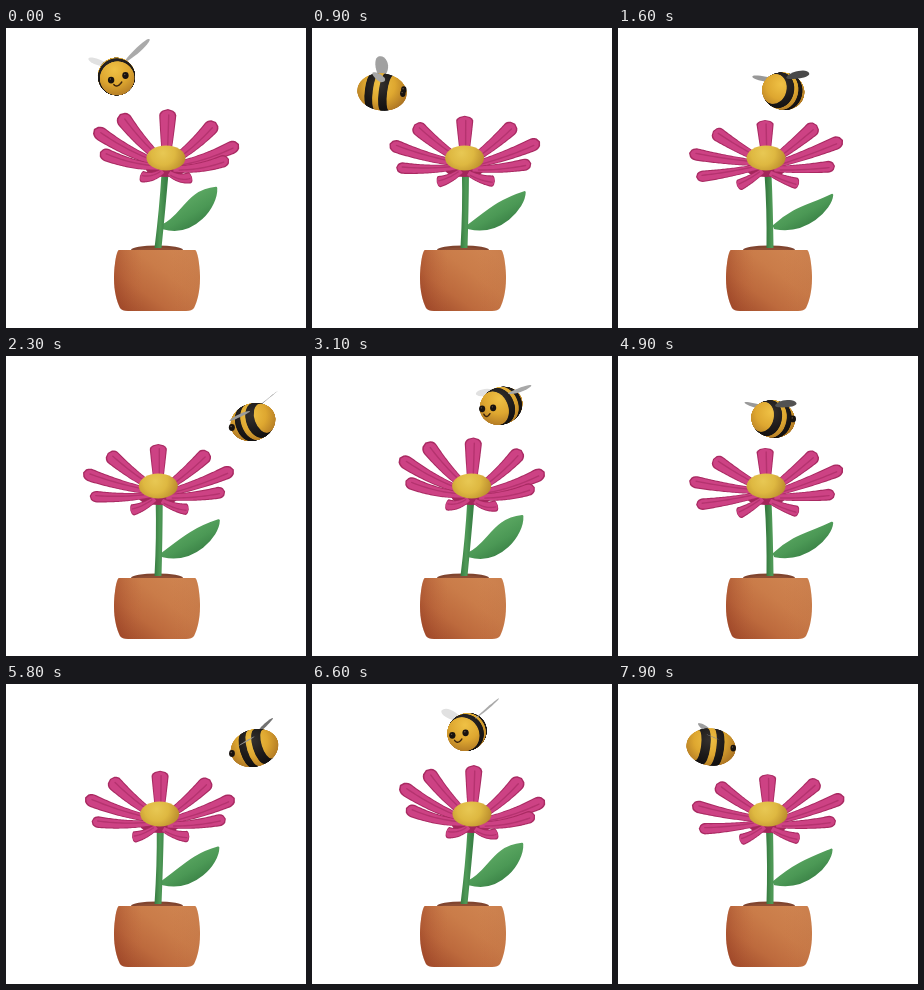
An HTML page with a canvas that plays this animation: 300 px wide and 300 px high, repeating every 8 s.

```html
<!DOCTYPE html>
<html lang="en">
<head>
<meta charset="utf-8">
<title>Bee and flower</title>
<style>
  html, body { margin: 0; width: 100%; height: 100%; overflow: hidden; background: #fff; }
  canvas { display: block; width: 300px; height: 300px; }
</style>
</head>
<body>
<canvas id="stage" width="300" height="300"></canvas>
<script>
const ctx = document.getElementById('stage').getContext('2d');
const LOOP = 8000, STEP = 100, ORBIT = 3370;
const TAU = Math.PI * 2;
const mix = (a, b, k) => a + (b - a) * k;

// One orbit of the bee: time, x, y, heading in degrees
const ORBIT_KEYS = [
  [0, 155, 48, 247], [140, 110.5, 48.5, 274], [370, 56, 55, 308], [600, 46, 60, 328],
  [770, 50, 62, 340], [1040, 70, 64, 356], [1300, 93, 63, 370], [1670, 155, 63, 405],
  [2170, 222, 65, 460], [2440, 247, 66, 500], [2840, 242, 58, 545], [3070, 226, 53, 570]
];

// Petal tips, back to front: x, y leaning right, then x, y leaning left
const PETALS = [
  [162, 81, 147, 92], [114, 86, 95, 103], [210, 94, 199, 97],
  [88, 101, 71, 125], [233, 116, 225, 112], [94, 124, 78, 149],
  [223, 131, 217, 138], [134, 148, 119, 158], [186, 149, 181, 156]
];

function key(i) {
  const n = ORBIT_KEYS.length, turn = Math.floor(i / n);
  const [u, x, y, h] = ORBIT_KEYS[i - turn * n];
  return [u + turn * ORBIT, x, y, h + turn * 360];
}

// Smooth interpolation through the unevenly spaced keys
function orbitAt(u) {
  let i = 0;
  while (key(i + 1)[0] <= u) i++;
  const [a, b, c, d] = [-1, 0, 1, 2].map(k => key(i + k));
  const span = c[0] - b[0], k = (u - b[0]) / span, k2 = k * k, k3 = k2 * k;
  return [1, 2, 3].map(j => {
    const m0 = (c[j] - a[j]) / (c[0] - a[0]) * span;
    const m1 = (d[j] - b[j]) / (d[0] - b[0]) * span;
    return (2 * k3 - 3 * k2 + 1) * b[j] + (k3 - 2 * k2 + k) * m0 +
           (3 * k2 - 2 * k3) * c[j] + (k3 - k2) * m1;
  });
}

function addStops(gradient, colours) {
  colours.forEach((c, i) => gradient.addColorStop(i / (colours.length - 1), c));
  return gradient;
}
const radial = (x, y, r, ...colours) => addStops(ctx.createRadialGradient(x, y, 0, x, y, r), colours);
const linear = (x0, y0, x1, y1, ...colours) => addStops(ctx.createLinearGradient(x0, y0, x1, y1), colours);

function oval(x, y, rx, ry, fill, turn = 0) {
  ctx.beginPath();
  ctx.ellipse(x, y, rx, ry, turn, 0, TAU);
  ctx.fillStyle = fill;
  ctx.fill();
}

function polygon(points, fill) {
  ctx.beginPath();
  points.forEach(p => ctx.lineTo(p[0], p[1]));
  ctx.closePath();
  ctx.fillStyle = fill;
  ctx.fill();
}

function drawSoil() {
  oval(151, 222, 26, 4.5, '#80452f');
  oval(151, 222.5, 22, 3, '#8e4e34');
}

function drawPot() {
  ctx.beginPath();
  ctx.moveTo(113, 222);
  ctx.lineTo(189, 222);
  ctx.bezierCurveTo(192, 223, 194, 240, 194, 250);
  ctx.bezierCurveTo(194, 264, 191, 274, 188, 280);
  ctx.quadraticCurveTo(186, 283, 180, 283);
  ctx.lineTo(122, 283);
  ctx.quadraticCurveTo(116, 283, 114, 280);
  ctx.bezierCurveTo(111, 274, 108, 264, 108, 250);
  ctx.bezierCurveTo(108, 240, 110, 223, 113, 222);
  ctx.fillStyle = linear(176, 222, 126, 290, '#cf8450', '#ca7c49', '#bd6a3d', '#a04a2a');
  ctx.fill();
  ctx.fillStyle = linear(108, 0, 194, 0, 'rgba(150,60,35,.4)', 'rgba(190,100,60,0)',
                         'rgba(190,100,60,0)', 'rgba(170,95,55,.15)');
  ctx.fill();
}

function drawStem(x, y) {
  ctx.beginPath();
  ctx.moveTo(148.5, 220);
  ctx.quadraticCurveTo(mix(149, x - 3, .5) + 1, 180, x - 3.5, y);
  ctx.lineTo(x + 3.5, y);
  ctx.quadraticCurveTo(mix(155, x + 3, .5) + 1, 180, 155.5, 220);
  ctx.closePath();
  ctx.fillStyle = linear(148, 0, 160, 0, '#35793f', '#4f9a57', '#3a8146');
  ctx.fill();
}

// lean: 0 = left end of the sway, 1 = right end
function drawLeaf(lean) {
  const at = (x0, y0, x1, y1) => [mix(x0, x1, lean), mix(y0, y1, lean)];
  ctx.beginPath();
  ctx.moveTo(156, 198);
  ctx.bezierCurveTo(...at(176, 179, 178, 188), ...at(192, 178, 180, 163), ...at(214, 167, 210, 160));
  ctx.bezierCurveTo(...at(213, 181, 211, 178), ...at(188, 206, 188, 209), 157, 200);
  ctx.closePath();
  const green = linear(178, 172, 194, 200, '#5aa661', '#4b9855', '#377d43');
  ctx.fillStyle = ctx.strokeStyle = green;
  ctx.lineWidth = 2.5;
  ctx.lineJoin = 'round';
  ctx.fill();
  ctx.stroke();
}

function drawPetal(bx, by, tx, ty, sag) {
  const mx = mix(bx, tx, .5), my = mix(by, ty, .5) + sag;
  const curve = (k, off) => {
    const q = 1 - k;
    const dx = q * (mx - bx) + k * (tx - mx), dy = q * (my - by) + k * (ty - my);
    const len = Math.hypot(dx, dy) || 1;
    return [q * q * bx + 2 * q * k * mx + k * k * tx - dy / len * off,
            q * q * by + 2 * q * k * my + k * k * ty + dx / len * off];
  };
  const shape = (width, end) => {
    const left = [], right = [];
    for (let i = 0; i <= 40; i++) {
      const k = i / 40 * end;
      const round = Math.sqrt(1 - Math.pow(Math.max(0, (i / 40 - .88) / .12), 2));
      const w = width * (.5 + .5 * Math.min(1, k / .9)) * round;
      left.push(curve(k, w));
      right.unshift(curve(k, -w));
    }
    return left.concat(right);
  };
  // Petals pointing up face the viewer and look wider
  const width = 5.8 + 2.8 * Math.max(0, by - ty) / Math.hypot(tx - bx, ty - by);
  polygon(shape(width, 1), '#a92a62');
  polygon(shape(width - 1.2, .98), '#cd4284');
  ctx.beginPath();
  for (let i = 2; i <= 18; i++) ctx.lineTo(...curve(i / 20, 1));
  ctx.strokeStyle = '#b5336f';
  ctx.lineWidth = 1.4;
  ctx.stroke();
}

function drawFlower(sway) {
  const lean = (sway + 1) / 2;
  const cx = mix(148, 160, lean), cy = 129;
  drawSoil();
  drawLeaf(lean);
  drawStem(cx - mix(-2, 1, lean), 146);
  drawPot();
  oval(cx, 141, 20, 8, '#a3265a');
  PETALS.forEach((p, i) => {
    const tx = mix(p[2], p[0], lean), ty = mix(p[3], p[1], lean);
    drawPetal(mix(cx, tx, .12), cy + 2 * i, tx, ty, mix(2, 6, lean));
  });
  oval(cx, cy + 1, 19.5, 12.5, radial(cx - 3, cy - 4, 24, '#e8c854', '#deb841', '#b98a2c'));
}

function drawBee(x, y, heading, flap) {
  const a = heading * Math.PI / 180, cos = Math.cos(a), sin = Math.sin(a);
  const HALF = 25, RADIUS = 18.5;
  const fwd = [cos * .97, .2 - .08 * cos];
  const side = [sin, .25 * cos - .3 * sin];
  const up = [.1 * -sin, -1];
  // forward, sideways and upward distance to stage position
  const at = (f, s, u) => [x + f * fwd[0] + s * side[0] + u * up[0],
                           y + f * fwd[1] + s * side[1] + u * up[1]];

  function wing(dir) {
    const tone = Math.round(Math.min(225, 160 - 50 * sin * dir - 60 * sin));
    const out = Math.cos(flap), rise = Math.sin(flap);
    const points = [];
    for (let i = 0; i < 28; i++) {
      const q = i / 28 * TAU, span = 14 - 14 * Math.cos(q);
      const chord = 8 * Math.sin(q) * (.6 + span / 70);
      points.push(at(chord - 2, dir * (7 + span * out), 12 + span * rise - chord * .3));
    }
    polygon(points, `rgb(${tone},${tone},${tone})`);
  }

  function body() {
    const shade = (...c) => radial(x - 2, y - 7, 30, ...c);
    const yellow = shade('#efc145', '#dea730', '#a87022');
    const black = shade('#34302e', '#1e1b1a', '#0e0c0c');
    const flat = Math.hypot(...fwd), depth = Math.sqrt(Math.max(0, 1 - flat * flat));
    const turn = Math.atan2(fwd[1], fwd[0]);
    const near = sin < 0 ? 1 : -1, N = 120;
    for (let i = 1; i < N; i++) {
      const s = near * (i / N * 2 - 1), r = RADIUS * Math.sqrt(1 - s * s);
      const band = (s > -.58 && s < -.22) || (s > .02 && s < .36);
      const [px, py] = at(s * HALF, 0, 0);
      oval(px, py, Math.max(.6, r * depth), r, band ? black : yellow, turn);
    }
  }

  function face() {
    [-1, 1].forEach(dir => {
      if (-sin * .85 + cos * dir * .4 < -.42) return;
      const [ex, ey] = at(22, 7.2 * dir, 3);
      oval(ex, ey, 2.7 + .5 * Math.abs(sin), 3.4, '#17120f');
      oval(ex - .7, ey - 1, .7, .7, '#6b5a4a');
    });
    if (sin > -.35) return;
    ctx.beginPath();
    for (let s = -4; s <= 4; s++) ctx.lineTo(...at(22.5, s, -5 + s * s * .16));
    ctx.strokeStyle = '#3a230c';
    ctx.lineWidth = 1.4;
    ctx.lineCap = 'round';
    ctx.stroke();
  }

  const front = dir => cos * dir > .15;
  [-1, 1].filter(d => !front(d)).forEach(wing);
  body();
  face();
  [-1, 1].filter(front).forEach(wing);
}

function draw(t) {
  ctx.clearRect(0, 0, 300, 300);
  const u = (t + 140) % ORBIT;
  drawFlower(Math.cos((u - 70) / ORBIT * TAU));
  const flap = (16 + 16 * Math.cos(t / 300 * TAU)) * Math.PI / 180;
  drawBee(...orbitAt(u), flap);
}

const start = performance.now();
function tick() {
  const t = (performance.now() - start) % LOOP;
  draw(Math.floor(t / STEP) * STEP);
  requestAnimationFrame(tick);
}
tick();
</script>
</body>
</html>
```
